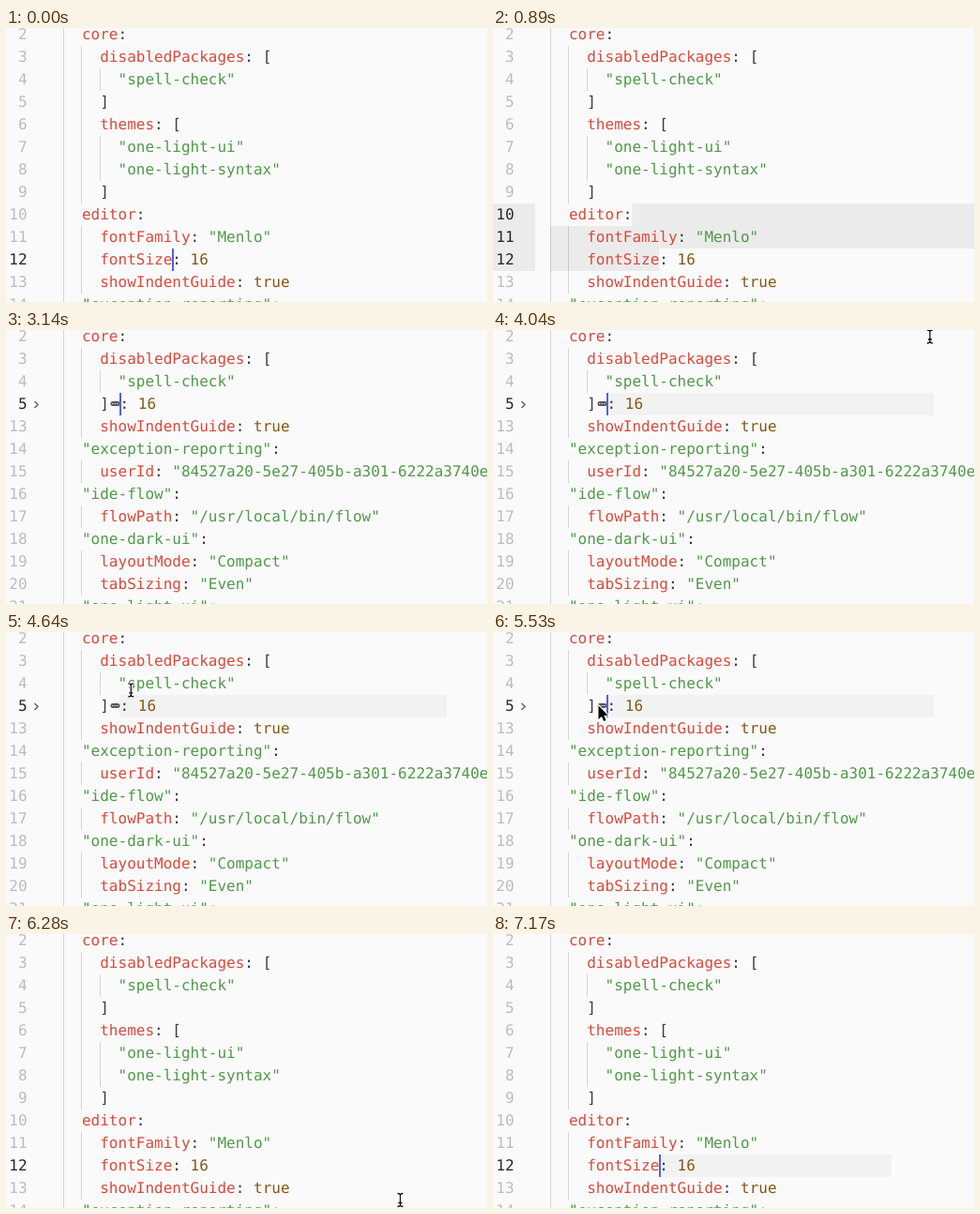
An HTML page with a canvas that plays this animation: 513x292 px, repeating every 7.32 s.

```html
<!DOCTYPE html>
<html lang="en">
<head>
<meta charset="utf-8">
<title>Code folding</title>
<style>
  html, body { margin: 0; width: 100%; height: 100%; overflow: hidden; background: #fafafa; }
  canvas { display: block; }
</style>
</head>
<body>
<canvas id="stage" width="513" height="292"></canvas>
<script>
const ctx = document.getElementById('stage').getContext('2d');
const WIDTH = 513, HEIGHT = 292, LOOP = 7320;
const ROW = 24, TOP = -5, FIRST = 2;
const LEFT = 61.7, CHAR = 9.633;
const FONT = '16px "DejaVu Sans Mono", monospace';
const COLOR = {
  back: '#fafafa', select: '#ebebeb', active: '#f2f2f2',
  key: '#d84a3d', string: '#51994a', value: '#835a14', plain: '#383a42',
  number: '#bcbcbc', current: '#26272b', caret: '#4f63e0', guide: 'rgba(0,0,0,.14)'
};

const LINES = `
  core:
    disabledPackages: [
      "spell-check"
    ]
    themes: [
      "one-light-ui"
      "one-light-syntax"
    ]
  editor:
    fontFamily: "Menlo"
    fontSize: 16
    showIndentGuide: true
  "exception-reporting":
    userId: "84527a20-5e27-405b-a301-6222a3740e00"
  "ide-flow":
    flowPath: "/usr/local/bin/flow"
  "one-dark-ui":
    layoutMode: "Compact"
    tabSizing: "Even"
  "one-light-ui":`.split('\n').slice(1);

const lineText = n => LINES[n - FIRST];
const colX = col => LEFT + col * CHAR;
const rowY = row => TOP + row * ROW;
const within = (t, from, to) => t >= from && t < to;

function rect(color, x, y, w, h) {
  ctx.fillStyle = color;
  ctx.fillRect(x, y, w, h);
}

function tokenColor(token, next) {
  if (token[0] === '"') return COLOR.string;
  if (/^(\d+|true)$/.test(token)) return COLOR.value;
  return /\w/.test(token) && next === ':' ? COLOR.key : COLOR.plain;
}

function drawCode(text, x, y) {
  for (const { 0: token, index } of text.matchAll(/"[^"]*"|\w+|\S/g)) {
    ctx.fillStyle = tokenColor(token, text[index + token.length]);
    ctx.fillText(token, x + index * CHAR, y);
  }
}

function drawLine(n, row, dark) {
  const text = lineText(n), y = rowY(row);
  const indent = text.search(/\S/);
  for (let col = 0; col < indent; col += 2) {
    rect(COLOR.guide, Math.floor(colX(col)), y, 1, ROW);
  }
  ctx.fillStyle = dark ? COLOR.current : COLOR.number;
  ctx.fillText(n, 22.6 - String(n).length * CHAR, y + 17);
  drawCode(text, LEFT, y + 17);
}

function drawFold(y) {
  ctx.fillStyle = '#55565c';
  ctx.beginPath();
  ctx.roundRect(111.5, y + 9, 10, 5, 2.5);
  ctx.fill();
  for (let i = 0; i < 3; i++) rect('#e4e4e4', 113 + i * 2.6, y + 11, 1.5, 1);
  drawCode(': 16', 121.5, y + 17);
  ctx.strokeStyle = '#66676c';
  ctx.lineWidth = 1.5;
  ctx.beginPath();
  ctx.moveTo(30.5, y + 9);
  ctx.lineTo(34, y + 12.5);
  ctx.lineTo(30.5, y + 16);
  ctx.stroke();
}

function drawSelection(head) {
  const endCol = n => Math.min(12, lineText(n).length);
  rect(COLOR.select, 0, rowY(head - FIRST), 45, (13 - head) * ROW);
  for (let n = head; n <= 12; n++) {
    const from = n === head ? colX(endCol(n)) : 61;
    const to = n === 12 ? colX(12) : WIDTH;
    rect(COLOR.select, from, rowY(n - FIRST), to - from, ROW);
  }
}

function drawBeam(x, y) {
  const path = new Path2D();
  for (const s of [-1, 1]) {
    path.moveTo(x - 3, y + s * 7);
    path.quadraticCurveTo(x, y + s * 7, x, y + s * 5);
    path.quadraticCurveTo(x, y + s * 7, x + 3, y + s * 7);
  }
  path.moveTo(x, y - 6);
  path.lineTo(x, y + 6);
  path.moveTo(x - 2, y + 3);
  path.lineTo(x + 2, y + 3);
  ctx.strokeStyle = '#fff';
  ctx.lineWidth = 3;
  ctx.stroke(path);
  ctx.strokeStyle = '#111';
  ctx.lineWidth = 1.3;
  ctx.stroke(path);
}

function drawArrow(x, y) {
  const path = new Path2D('M0 0V14.5L3.4 11.4L5.7 16.6L8 15.6L5.8 10.5H10.4Z');
  ctx.save();
  ctx.translate(x, y);
  ctx.strokeStyle = '#fff';
  ctx.lineWidth = 2;
  ctx.stroke(path);
  ctx.fillStyle = '#000';
  ctx.fill(path);
  ctx.restore();
}

function drawMouse(t) {
  if (within(t, 4040, 4928)) {
    const left = 1 - Math.floor((t - 4040) / 148) / 6;
    drawBeam(113 + 353 * left ** 2.6, 78 - 71 * left ** 1.35);
  } else if (within(t, 4928, 5680)) {
    drawArrow(112.5, t < 5230 ? 75.5 : 78.5);
  } else if (within(t, 5680, 6420)) {
    const step = t < 5980 ? 0 : t < 6130 ? 1 : t < 6270 ? 2 : 3;
    const moved = (step / 3) ** 1.5;
    drawBeam(113.5 + 307 * moved, 79.5 + 204 * moved);
  }
}

const CARET_OFF = [[150, 440], [740, 3140], [3590, 4040], [4340, 4790],
  [5230, 5530], [6130, 6420], [6720, 7170]];

function draw(t) {
  const folded = within(t, 3140, 5680);
  const selecting = within(t, 740, 3140);
  const head = selecting ? 11 - Math.min(6, Math.floor((t - 740) / 150)) : 12;

  rect(COLOR.back, 0, 0, WIDTH, HEIGHT);
  if (selecting) drawSelection(head);
  if (within(t, 4040, 5680)) rect(COLOR.active, 121, 67, 349, ROW);
  if (t >= 6420) rect(COLOR.active, 177, 235, 248, ROW);

  ctx.font = FONT;
  ctx.textRendering = 'geometricPrecision';
  for (let row = 0; row < 13; row++) {
    const n = FIRST + row + (folded && row > 3 ? 7 : 0);
    drawLine(n, row, folded ? n === 5 : n >= head && n <= 12);
  }
  if (folded) drawFold(rowY(3));

  if (!CARET_OFF.some(([from, to]) => within(t, from, to))) {
    rect(COLOR.caret, folded ? 121 : 177, folded ? 67 : 235, 2, ROW);
  }
  drawMouse(t);
}

const start = performance.now();
function frame() {
  draw((performance.now() - start) % LOOP);
  requestAnimationFrame(frame);
}
frame();
</script>
</body>
</html>
```
